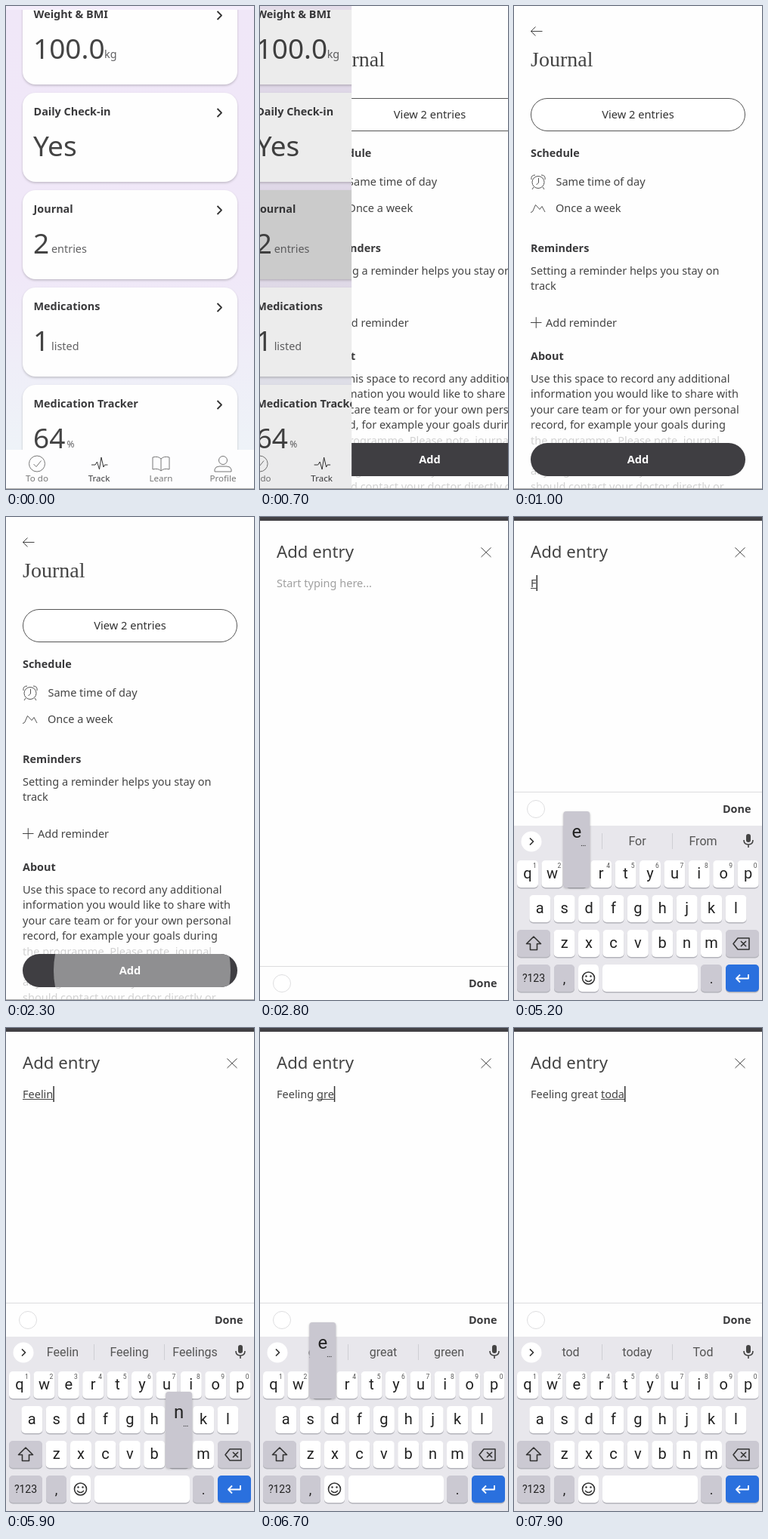
An HTML page for the animation above (8 s loop, 328 by 640 pixels).

```html
<!DOCTYPE html>
<html lang="en">
<head>
<meta charset="utf-8">
<title>Journal entry</title>
<style>
html, body { margin: 0; width: 100%; height: 100%; overflow: hidden; background: #fff; }
svg { display: block; width: 100vw; height: 100vh; font-family: 'Noto Sans', sans-serif; }
.key { font-family: Roboto, sans-serif; }
.serif { font-family: 'Liberation Serif', serif; }
</style>
</head>
<body>
<svg id="stage" viewBox="0 0 328 640"></svg>
<script>
const W = 328, H = 640, LOOP = 8000, STEP = 100;
const INK = '#444', DARK = '#3f3e42', GREY = '#cbc9d2', BODY = 14.5;
const stage = document.getElementById('stage');
const pen = document.createElement('canvas').getContext('2d');

const text = (x, y, size, s, fill = INK, more = '') =>
  `<text x="${x}" y="${y}" font-size="${size}" fill="${fill}" ${more}>${s}</text>`;
const rect = (x, y, w, h, r, fill, more = '') =>
  `<rect x="${x}" y="${y}" width="${w}" height="${h}" rx="${r}" fill="${fill}" ${more}/>`;
const circle = (x, y, r, fill, more = '') => `<circle cx="${x}" cy="${y}" r="${r}" fill="${fill}" ${more}/>`;
const path = (d, stroke = INK, w = 1, fill = 'none') =>
  `<path d="${d}" stroke="${stroke}" stroke-width="${w}" fill="${fill}" stroke-linejoin="round"/>`;
const move = (x, y, s) => `<g transform="translate(${x} ${y})">${s}</g>`;
const clip = (id, shape, s) => `<clipPath id="${id}">${shape}</clipPath><g clip-path="url(#${id})">${s}</g>`;
const MID = 'text-anchor="middle"', BOLD = 'font-weight="600"';
const heading = (y, s) => text(22, y, 14.4, s, '#3a3a3c', BOLD);

// 1 at the start of a move, 0 at its end
const left = (t, start, length, power) =>
  Math.pow(1 - Math.min(1, Math.max(0, (t - start) / length)), power);
const width = s => {
  pen.font = `${BODY}px "Noto Sans", sans-serif`;
  return pen.measureText(s).width;
};

function card(top, title, value, unit, unitX, fill = '#fefefe') {
  return rect(22, top + 1.5, 284, 118, 17, '#000', 'opacity=".2" filter="url(#soft)"') +
    rect(22, top, 284, 118, 17, fill) +
    text(36.5, top + 30, 14.4, title, '#3a3a3c', BOLD) +
    path(`M279.5 ${top + 21}l5.5 5.5l-5.5 5.5`, '#333', 1.8) +
    text(36, top + 84, 37, value) +
    text(unitX, top + 83, unit == '%' ? 12 : 14.4, unit, '#626264');
}

function trackPage(t) {
  const tab = (x, s, fill = '#777') => text(x, 630, 11.6, s, fill, MID);
  return rect(-50, 0, 428, H, 0, 'url(#sky)') +
    card(-14, 'Weight &amp; BMI', '100.0', 'kg', 130) +
    card(115, 'Daily Check-in', 'Yes', '', 0) +
    card(244, 'Journal', '2', 'entries', 60, t >= 500 ? '#dadada' : '#fefefe') +
    card(373, 'Medications', '1', 'listed', 60) +
    card(502, 'Medication Tracker', '64', '%', 80.5) +
    rect(-50, 0, 428, 5, 0, '#f4edfb') +
    rect(-50, 588, 428, 52, 0, '#fdfdfe') +
    circle(41, 606.5, 10.5, 'none', 'stroke="#777"') + path('M36.5 607l3.5 3.5l6.5-8', '#777') +
    path('M113 608h5l2.5-4l3 10l2.5-16l3 13l1.5-3h4', '#333') +
    path('M205 600q-4-4-11-2v16q7-2 11 2q4-4 11-2v-16q-7-2-11 2v16', '#777') +
    circle(287, 602, 5.5, 'none', 'stroke="#777"') + path('M276 617v-3q1-4 6-4h10q5 0 6 4v3z', '#777') +
    tab(41, 'To do') + tab(123, 'Track', '#3a3a3c') + tab(205, 'Learn') + tab(287, 'Profile') +
    rect(-50, 639, 428, 1, 0, '#aaa');
}

const ABOUT = ['Use this space to record any additional', 'information you would like to share with',
  'your care team or for your own personal', 'record, for example your goals during',
  'the programme. Please note, journal', 'entries are not read every day, so', 'any urgent concerns you have,',
  'should contact your doctor directly or'];

function journalPage(t) {
  const button = more => rect(22, 579, 284, 44, 22, DARK, more);
  const ripple = t < 2300 ? '' : circle(180, 601, 117 + (t - 2300) * .6, '#8f8f91');
  return rect(0, 0, W, H, 0, '#fefefe') +
    path('M37.5 33.5H22.5m6-6l-6 6l6 6') +
    text(22, 79.5, 28, 'Journal', INK, 'class="serif"') +
    rect(22.5, 122.5, 283, 43, 21.5, '#fff', 'stroke="#555"') +
    text(164, 149, 14.6, 'View 2 entries', '#333', MID) +
    heading(200, 'Schedule') +
    circle(32, 233.5, 8, 'none', 'stroke="#555"') +
    path('M32.5 228v6l-3 3M23 230q-1-6 5-6M41 230q1-6-5-6M26 240l-2 3M38 240l2 3', '#555') +
    text(55.5, 238, BODY, 'Same time of day') +
    path('M22 273.5l2.5-1l4-9l5.5 6l3-4l4 7.5', '#555') +
    text(55, 273, BODY, 'Once a week') +
    heading(326, 'Reminders') +
    text(22, 356, BODY, 'Setting a reminder helps you stay on') +
    text(22, 376, BODY, 'track') +
    path('M22 419.5h14.500m-7.250-7.250v14.500') +
    text(42, 425, BODY, 'Add reminder') +
    heading(469, 'About') +
    ABOUT.map((s, i) => text(22, 499 + i * 20.4, BODY, s, i < 4 ? INK : '#d2d2d2')).join('') +
    button() + clip('pill', button(), ripple) +
    text(164, 606, 14.6, 'Add', '#fff', MID + BOLD) +
    rect(0, 639, W, 1, 0, '#aaa');
}

// [character, time of press]; it is written one step later
const PRESSES = [['F', 5000], ['e', 5200], ['e', 5400], ['l', 5500], ['i', 5700], ['n', 5800], ['g', 6000],
  [' ', 6100], ['g', 6300], ['r', 6400], ['e', 6600], ['a', 6800], ['t', 6900], [' ', 7000],
  ['t', 7200], ['o', 7400], ['d', 7500], ['a', 7700]];
const HINTS = {
  F: 'F For From', Fe: 'Fe Feel Feb', Fee: 'Fee Feel Feeling', Feel: 'Feel Feeling Feels',
  Feeli: 'Feeli Feeling Feelings', Feelin: 'Feelin Feeling Feelings', Feeling: 'Feeling Feelings Feelin',
  '': 'good and like', g: 'g good great', gr: 'gr great green', gre: 'gre great green',
  grea: 'grea great greatly', great: 'great greater greatest', t: 't to the', to: 'to today too',
  tod: 'tod today Tod', toda: 'tod today Tod'
};
const ROWS = ['qwertyuiop', 'asdfghjkl', 'zxcvbnm'], PITCH = 32.4;
const keyX = (row, i) => [18, 34.3, 66.6][row] + i * PITCH;
const keyY = row => 455 + row * 46;

function keyboard(t, typed, word) {
  const pressed = PRESSES.filter(p => t >= p[1] && t < p[1] + 2 * STEP).pop();
  const caps = t >= 4700 && t < 5100;
  const key = (x, y, w, fill = '#fff') =>
    rect(x, y + 1, w, 36.5, 5, '#b4b4bb') + rect(x, y, w, 36, 5, fill);
  const label = (x, y, s, size = 20) => text(x, y, size, s, '#222', MID + ' class="key"');
  let s = rect(0, 409, W, 231, 0, '#e8e7ec') + circle(23, 430, 13.5, '#fff');
  s += path(typed ? 'M21 425.500l4.500 4.500l-4.500 4.500' : 'M25 425.500l-4.500 4.500l4.500 4.500', '#333', 1.7);
  s += rect(307, 420, 6, 11, 3, INK) + path('M304 428q0 6 6 6t6-6M310 434v4', INK, 1.6);

  if (typed) {
    s += rect(116, 419, 1, 21, 0, '#cfcfd4') + rect(209, 419, 1, 21, 0, '#cfcfd4');
    (HINTS[word] || HINTS['']).split(' ').forEach((hint, i) => {
      s += text([75, 163, 250][i], 435, 16, hint, '#555', MID + ' class="key"');
    });
  } else {
    s += path('M58 422.500h14v9l-5 5h-9zM72 431.500h-5v5M61.500 430q3 4 6 0', '#555', 1.6) +
      circle(62, 427, 1, '#555') + circle(68, 427, 1, '#555') +
      text(111, 434, 12.5, 'GIF', '#555', MID + ' class="key" font-weight="900"') +
      path('M151.500 423.500h12.500v13.500h-12.500zM155 422h5.500v3h-5.500zM154.500 429h6.500M154.500 433h4.500', '#555', 1.6) +
      circle(204.5, 429.5, 4.5, 'none', 'stroke="#555" stroke-width="4"') +
      circle(204.5, 429.5, 7, 'none', 'stroke="#555" stroke-width="2.500" stroke-dasharray="3.660"') +
      rect(233, 420, 1, 19, 0, '#cfcfd4') +
      [257, 263, 269].map(x => circle(x, 429.5, 1.8, '#555')).join('');
  }

  ROWS.forEach((row, r) => [...row].forEach((c, i) => {
    const x = keyX(r, i), y = keyY(r);
    s += key(x - 14, y, 28) + label(x, y + 24, caps ? c.toUpperCase() : c);
    if (!r) s += text(x + 9.5, y + 9.5, 8.5, (i + 1) % 10, '#555', MID + ' class="key"');
  }));
  const shiftDown = t == 4700;
  s += key(4, 547, 44, shiftDown ? '#b5b3bd' : GREY) +
    path('M26 556l9.500 9.500h-5v8h-9v-8h-5z', '#333', 1.6, caps ? '#333' : 'none') +
    key(280, 547, 44, GREY) + path('M290 565.500l6-7.500h15v15h-15zM300 562l7 7m0-7l-7 7', '#333', 1.6) +
    key(4, 593, 44, GREY) + label(26, 616, '?123', 14) +
    key(53, 593, 27, GREY) + label(66.5, 618, ',', 18) +
    key(85, 593, 27) + circle(98.5, 611, 8, 'none', 'stroke="#333" stroke-width="1.600"') +
    circle(95.5, 608.5, 1.2, '#333') + circle(101.5, 608.5, 1.2, '#333') + path('M94 613q4.500 5 9 0', '#333', 1.5) +
    key(117, 593, 126, pressed && pressed[0] == ' ' ? GREY : '#fff') +
    key(247, 593, 28, GREY) + label(261, 618, '.', 18) +
    key(280, 593, 44, '#2a70de') + path('M310 606v5.500h-16m5-5l-5 5l5 5', '#fff', 1.8);

  if (pressed && pressed[0] != ' ') {
    const c = pressed[0].toLowerCase(), r = ROWS.findIndex(row => row.includes(c));
    const x = keyX(r, ROWS[r].indexOf(c)), y = keyY(r);
    s += rect(x - 17.5, y - 64, 35, 101, 4, '#000', 'opacity=".25" filter="url(#soft)"') +
      rect(x - 17.5, y - 65, 35, 101, 4, '#c9c7d0') +
      label(x, y - 30, caps ? pressed[0] : c, 24);
    if (!r || 'asnl'.includes(c)) s += label(x + 9, y - 19, '…', 11);
  }
  return s;
}

function entryPage(t) {
  const typed = PRESSES.filter(p => t >= p[1] + STEP).map(p => p[0]).join('');
  const word = typed.split(' ').pop();
  const end = 22 + width(typed), from = end - width(word);
  const barY = t < 3700 ? 596 : 365;
  let s = rect(0, 5, W, H, 0, '#fefefe') +
    text(22, 54, 22.2, 'Add entry') +
    path('M292.500 40.500l13 12.500m0-12.500l-13 12.500') +
    text(22, 92.5, BODY, typed || 'Start typing here...', typed ? INK : '#a0a0a0') +
    rect(from, 94, end - from, 1, 0, INK);
  if (t >= 3600) s += rect(end, 77, 1.5, 21, 0, '#333');
  s += rect(0, barY - 1, W, 1, 0, '#dcdcde') +
    circle(29, barY + 22, 11.5, '#fff', 'stroke="#dedee0"') +
    text(313.5, barY + 27, 14.4, 'Done', '#3a3a3c', BOLD + ' text-anchor="end"');
  if (t >= 3700) s += move(0, 231 * left(t, 3700, 500, 3), keyboard(t, typed, word));
  return s;
}

const DEFS = `<defs>
  <linearGradient id="sky" gradientUnits="userSpaceOnUse" x1="0" y1="0" x2="0" y2="588">
    <stop offset="0" stop-color="#f0e7f8"/><stop offset=".6" stop-color="#f0e8f8"/><stop offset="1" stop-color="#eef3f8"/>
  </linearGradient>
  <filter id="soft" x="-10%" y="-10%" width="120%" height="120%"><feGaussianBlur stdDeviation="1.5"/></filter>
</defs>`;

function scene(t) {
  const edge = W * left(t, 500, 500, 1.95), open = 1 - edge / W;
  const rise = left(t, 2400, 400, 3);
  let s = DEFS;
  if (edge > 0) s += move(-.2 * (W - edge), 0, trackPage(t)) + rect(0, 0, W, H, 0, '#000', `opacity="${.11 * open}"`);
  if (open > 0) s += clip('reveal', rect(edge, 0, W, H, 0, '#fff'), move(edge / 2, 0, journalPage(t)));
  if (rise < 1) s += rect(0, 0, W, H, 0, '#020006', `opacity="${.74 * (1 - rise)}"`) + move(0, 635 * rise, entryPage(t));
  return s;
}

let shown = -1;
function tick(now) {
  const t = Math.floor(now % LOOP / STEP) * STEP;
  if (t != shown) stage.innerHTML = scene(shown = t);
  requestAnimationFrame(tick);
}
tick(0);
</script>
</body>
</html>
```
